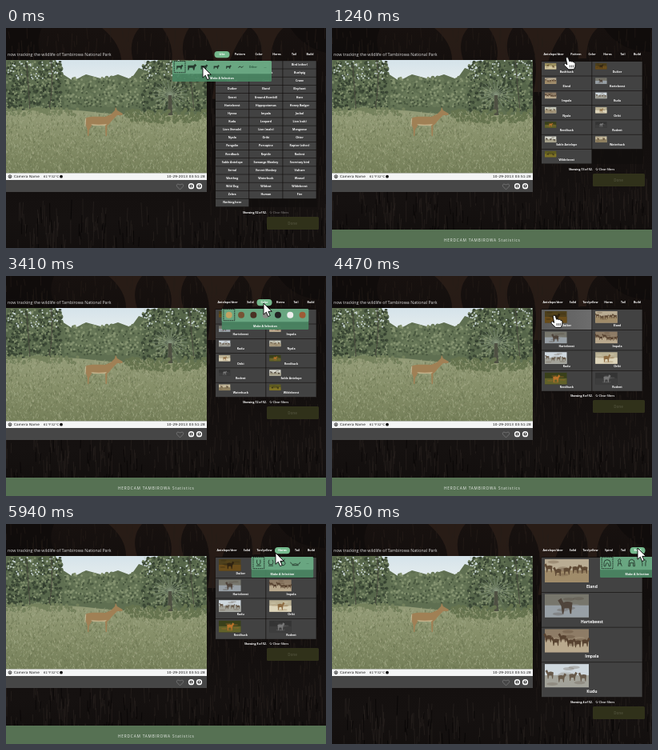
These frames come from a looping animation (400x275 px, 8 s). An HTML page:

```html
<!DOCTYPE html>
<html lang="en">
<head>
<meta charset="utf-8">
<title>Wildlife tracker filters</title>
<style>
html, body { margin: 0; width: 100%; height: 100%; overflow: hidden; background: #120e0c; }
svg { display: block; }
#stage { width: 100vw; height: 100vh; }
text { font-family: "Open Sans", sans-serif; fill: #fff; }
.ui { font-size: 3.5px; font-weight: 700; text-anchor: middle; }
.stamp text { font-family: "DejaVu Sans", sans-serif; font-size: 4.2px; letter-spacing: .18px; fill: #111; }
</style>
</head>
<body>
<svg id="stage" viewBox="0 0 400 275">
  <defs>
    <linearGradient id="dusk" x2="0" y2="1">
      <stop offset="0" stop-color="#17110f"/><stop offset=".25" stop-color="#110d0c"/>
      <stop offset=".7" stop-color="#151110"/><stop offset="1" stop-color="#0e0b0a"/>
    </linearGradient>
    <linearGradient id="sky" x2="0" y2="1">
      <stop offset="0" stop-color="#d5e3ea"/><stop offset=".3" stop-color="#eef2f0"/>
    </linearGradient>
    <linearGradient id="field" x2="0" y2="1">
      <stop offset="0" stop-color="#949c78"/><stop offset=".45" stop-color="#868f69"/>
      <stop offset="1" stop-color="#757f59"/>
    </linearGradient>
    <linearGradient id="lit" x2="1" y2="0">
      <stop offset="0" stop-color="#5b5b5b"/><stop offset="1" stop-color="#6d6d6d"/>
    </linearGradient>
  </defs>
  <g id="back"></g>
  <text x="2" y="35.2" font-size="5.3" fill-opacity=".85">now tracking the wildlife of Tambirowa National Park</text>
  <svg id="photo" y="40" width="251" height="141.5" viewBox="0 40 251 141.5"></svg>
  <g class="stamp">
    <path d="M0 181.5H251V190H0Z" fill="#f4f5f5"/>
    <circle cx="5" cy="185.7" r="1.9" fill="none" stroke="#222" stroke-width=".8"/>
    <path d="M3.7 184.4l2.6 2.6m0-2.6l-2.6 2.6" stroke="#222" stroke-width=".7"/>
    <text x="10" y="187.3">Camera Name</text>
    <text x="47" y="187.3" style="font-size:3.7px">61°F32°C</text>
    <circle cx="69" cy="185.7" r="1.9" fill="#111"/>
    <text x="201" y="187.3">10-29-2013 03:51:28</text>
  </g>
  <path d="M0 190H251V205H0Z" fill="#464646"/>
  <path d="M217.5 201.6C211 197.5 213 193.3 217.5 196C222 193.3 224 197.5 217.5 201.6Z" fill="none" stroke="#858585" stroke-width=".7"/>
  <g fill="#3a3a3a" stroke="#fff" stroke-width="1.5"><circle cx="231.5" cy="197.7" r="2.9"/><circle cx="241.5" cy="197.7" r="2.9"/></g>
  <path d="M231.5 196v.8m0 .7v2M241.5 196v2.2m0 .6v.7" stroke="#fff" stroke-width=".9"/>
  <g id="ui"></g>
  <g id="cursor"></g>
</svg>
<script>
const LOOP = 8000;
const $ = id => document.getElementById(id);

function rng(seed) {
  return () => (seed = (seed * 16807) % 2147483647) / 2147483647;
}

// Short random strokes gathered in one path.
function strokes(seed, n, [x, y, w, h], len, color, width) {
  const r = rng(seed * 7919);
  let d = '';
  for (let i = 0; i < n; i++) {
    d += `M${(x + r() * w).toFixed(1)} ${(y + r() * h).toFixed(1)}l${(r() * 3 - 1.5).toFixed(1)} ${(-len * (.4 + r())).toFixed(1)}`;
  }
  return `<path d="${d}" fill="none" stroke="${color}" stroke-width="${width}"/>`;
}

// Round dabs, drawn as zero-length strokes.
function leaves(seed, n, [x, y, w, h], size, color) {
  const r = rng(seed * 7919);
  let d = '';
  for (let i = 0; i < n; i++) d += `M${(x + r() * w).toFixed(1)} ${(y + r() * h).toFixed(1)}h0`;
  return `<path d="${d}" stroke="${color}" stroke-width="${size}" stroke-linecap="round"/>`;
}

const rect = (x, y, w, h, fill, more = '') =>
  `<rect x="${x}" y="${y}" width="${w}" height="${h}" fill="${fill}" ${more}/>`;
const label = (x, y, s, more = '') => `<text class="ui" x="${x}" y="${y}" ${more}>${s}</text>`;

function drawBack() {
  $('back').innerHTML = rect(0, 0, 400, 310, 'url(#dusk)') +
    `<path d="M128 0Q150 18 150 40H164Q156 16 170 0ZM196 0Q210 20 206 40H222Q214 18 226 0ZM238 0Q262 26 252 80H262Q268 30 292 0ZM296 0Q310 12 308 38H318Q318 12 332 0Z" fill="#2f211a" opacity=".7"/>
    <path d="M0 0H60Q50 24 66 40H0ZM340 0H400V30Q360 30 340 0Z" fill="#0b0908" opacity=".5"/>` +
    strokes(5, 300, [0, 215, 400, 95], 20, '#2a2421', .6) +
    strokes(8, 200, [250, 60, 150, 190], 20, '#241d1a', .6) +
    strokes(9, 140, [0, 215, 400, 95], 16, '#080606', .8) +
    strokes(3, 90, [0, 10, 400, 35], 14, '#261d19', .6);
}

function drawTree(seed, x, w) {
  const box = [x, 42, w, 62];
  return leaves(seed, 170, box, 6, '#56664a') + leaves(seed + 1, 130, box, 4, '#3c4936') +
    leaves(seed + 2, 160, box, 2.6, '#7d8b69') + leaves(seed + 3, 90, box, 2, '#2f3a2c') +
    leaves(seed + 4, 50, [x, 40, w, 24], 2, '#c9d5d3');
}

function drawPhoto() {
  let palm = '';
  for (let i = 0; i < 22; i++) {
    const a = i * Math.PI * 2 / 22;
    palm += `M205 83l${(Math.cos(a) * 22).toFixed(1)} ${(Math.sin(a) * 18).toFixed(1)}`;
  }
  const ground = [0, 106, 251, 78];
  $('photo').innerHTML = rect(0, 40, 251, 142, 'url(#sky)') +
    `<path d="M0 40H62L70 57 84 66 100 58 122 64 140 58 156 64 166 50 178 54 190 40H251V125H0Z" fill="#5f6f51"/>` +
    leaves(31, 150, [74, 62, 96, 36], 5, '#687858') + leaves(32, 120, [74, 62, 96, 36], 3, '#84926f') +
    leaves(33, 90, [74, 66, 96, 34], 2.6, '#4a5940') +
    drawTree(41, 0, 70) + drawTree(51, 170, 81) +
    `<path d="M56 40Q60 68 54 101M26 46L30 103M229 40L235 104" stroke="#4b4b3f" stroke-width="1" fill="none"/>
    <path d="${palm}" stroke="#87967f" stroke-width=".7"/>
    <path d="M203 84h4l1 26h-6z" fill="#4f5143"/>
    <path d="M0 104Q60 99 110 105T251 108V182H0Z" fill="url(#field)"/>` +
    leaves(61, 90, [150, 102, 101, 16], 5, '#66744f') + leaves(62, 70, [0, 100, 90, 9], 4, '#75825d') +
    strokes(21, 1100, ground, 2.6, '#a2aa87', .6) +
    strokes(22, 1100, ground, 2.6, '#69734f', .6) +
    strokes(23, 300, ground, 2, '#b6b799', .5) +
    `<path d="M99.5 113C103 110 113 111 124 111L131 108 136 103 137 98.5 139 103 146 107 145 109 139 109 133 115 129 120 126.5 122 126 135H124.6L124 122 108 120.5 104 127 103.3 135H102L101.7 127 99.8 121Z" fill="#a08055"/>
    <path d="M106 120Q116 121.5 126 120L124 122H109Z" fill="#c4b28b"/>
    <path d="M99.7 113L98.8 123" stroke="#d3c5a4" stroke-width=".8"/>`;
}

// Upper tone, lower tone, animal tone, herd size
const SPECIES = {
  Bushbuck: ['#9c915f', '#d3c7a0', '#60492a', 2], Duiker: ['#4e401c', '#6a4d1b', '#2f2311', 1],
  Eland: ['#b9ac93', '#a08c6a', '#5f4a35', 5], Hartebeest: ['#77766c', '#98a0a6', '#4f443b', 1],
  Impala: ['#8e7c66', '#b9a98e', '#574230', 6], Kudu: ['#cfd8de', '#a3a39a', '#675a4b', 4],
  Nyala: ['#c7c9bc', '#a5977b', '#6c5b43', 3], Oribi: ['#b9b093', '#ddd5bb', '#8d6c43', 1],
  Reedbuck: ['#39401a', '#62622a', '#b9722b', 1], Rodent: ['#343434', '#3d3d3d', '#777', 1],
  'Sable Antelope': ['#d5d5cb', '#a9a48e', '#4b4136', 3], Waterbuck: ['#c8bda0', '#8f8060', '#5c4a35', 2],
  Wildebeest: ['#5f5c20', '#807426', '#37331a', 2]
};
const ALL = ('Baboon,Bat,Bird (other),Buffalo,Bushbuck,Bushpig,Caracal,Civet,Crane,Duiker,Eland,Elephant,' +
  'Genet,Ground Hornbill,Hare,Hartebeest,Hippopotamus,Honey Badger,Hyena,Impala,Jackal,Kudu,Leopard,Lion (cub),' +
  'Lion (female),Lion (male),Mongoose,Nyala,Oribi,Otter,Pangolin,Porcupine,Raptor (other),Reedbuck,Reptile,Rodent,' +
  'Sable Antelope,Samango Monkey,Secretary bird,Serval,Vervet Monkey,Vulture,Warthog,Waterbuck,Weasel,' +
  'Wild Dog,Wildcat,Wildebeest,Zebra,Human,Fire,Nothing here').split(',');
const DEER = Object.keys(SPECIES);
const SOLID = DEER.slice(1);
const TAN = SOLID.filter(s => !/Nyala|Sable|Water|Wilde/.test(s));
const SPIRAL = ['Eland', 'Hartebeest', 'Impala', 'Kudu'];

const STAGES = [
  { t: 0, items: ALL, cols: 3, pitch: 10.15, tabs: ['Like', 'Pattern', 'Color', 'Horns', 'Tail', 'Build'], xs: [270, 292.5, 316, 338.5, 360, 380], done: 236 },
  { t: 390, items: DEER, cols: 2, pitch: 18.3, tabs: ['Antelope/deer', 'Pattern', 'Color', 'Horns', 'Tail', 'Build'], xs: [277, 305, 325, 344.5, 363.5, 381.5], done: 182 },
  { t: 2320, items: SOLID, cols: 2, pitch: 18.3, tabs: ['Antelope/deer', 'Solid', 'Color', 'Horns', 'Tail', 'Build'], xs: [277, 305.5, 323, 343, 362.5, 381], done: 163 },
  { t: 4410, items: TAN, cols: 2, pitch: 25.6, tabs: ['Antelope/deer', 'Solid', 'Tan/yellow', 'Horns', 'Tail', 'Build'], xs: [276, 301, 323, 345.5, 364, 381.5], done: 155 },
  { t: 7130, items: SPIRAL, cols: 1, pitch: 43.7, tabs: ['Antelope/deer', 'Solid', 'Tan/yellow', 'Spiral', 'Tail', 'Build'], xs: [276, 301, 323, 346, 364, 382], done: 228 }
];
const stageAt = t => STAGES.filter(s => s.t <= t).pop();

const MENUS = [
  { tab: 0, from: -200, to: 300, x: 270, n: 8 },
  { tab: 1, from: 1530, to: 2240, x: 303, n: 5 },
  { tab: 2, from: 3000, to: 4350, x: 324, n: 7 },
  { tab: 3, from: 5580, to: 7000, x: 345.5, n: 5, unmark: 6700 },
  { tab: 5, from: 7790, to: LOOP, x: 381.5, n: 6 }
];

// Pointer stops: time, x, y
const PATH = [
  [0, 246, 48], [950, 246, 49], [1240, 294, 36.5], [1350, 311, 32], [1830, 311, 32], [2180, 273, 49],
  [2650, 273, 49], [2820, 326, 28], [3100, 326, 28], [3410, 322, 34], [3650, 322, 34], [4110, 278, 49],
  [4600, 278, 49], [5040, 343, 31], [5820, 343, 31], [5940, 337, 36], [6200, 329, 48], [6590, 341, 49.5],
  [7180, 341, 49.5], [7510, 382, 30], [LOOP, 382, 30]
];
const ARROWS = [[0, 120], [1530, 2050], [3000, 3900], [5400, 6080], [7510, LOOP]];

function pointer(t) {
  const i = Math.max(1, PATH.findIndex(p => p[0] > t));
  const [t0, x0, y0] = PATH[i - 1], [t1, x1, y1] = PATH[i];
  const k = (t - t0) / (t1 - t0);
  return [x0 + (x1 - x0) * k, y0 + (y1 - y0) * k];
}

function thumb(name, x, y, scale) {
  const [top, low, body, herd] = SPECIES[name];
  const r = rng(name.length * 97700 + name.charCodeAt(0) * 331);
  r();
  let s = rect(0, 0, 55, 29, top) + rect(0, 14, 55, 15, low);
  for (let i = 0; i < 9; i++) {
    s += `<ellipse cx="${(8 + r() * 39).toFixed(1)}" cy="${(3 + r() * 22).toFixed(1)}" rx="7" ry="2" fill="${i % 2 ? low : body}" opacity=".3"/>`;
  }
  const size = herd === 1 ? 1.4 : .8;
  for (let i = 0; i < herd; i++) {
    const cx = 55 * (i + .5) / herd, cy = 12 + (herd > 1 ? r() * 7 - 3 : 0);
    const flip = r() > .5 ? -size : size;
    s += `<path transform="translate(${cx.toFixed(1)} ${cy.toFixed(1)}) scale(${flip} ${size})" d="M-5 -1q5 -2 8 0l2 -4 3 2 -3 5 -1 7h-1l-1 -5h-4l-1 5h-1z" fill="${body}"/>`;
  }
  return `<g transform="translate(${x} ${y}) scale(${scale})">${s}</g>`;
}

function list(st, mx, my) {
  const { items, cols, pitch } = st, w = 126.4 / cols, top = cols === 3 ? 41.2 : 42;
  return items.map((name, i) => {
    const x = 262 + (i % cols) * w, y = top + Math.floor(i / cols) * pitch;
    const over = mx >= x && mx < x + w && my >= y && my < y + pitch;
    const cell = rect(x, y, w - .7, pitch - .6, over ? 'url(#lit)' : '#424242');
    const mid = x + w / 2;
    if (cols === 3) return cell + label(mid - .3, y + 5.7, name);
    const scale = cols === 1 ? 1 : pitch > 20 ? .5 : .26;
    const base = cols === 1 ? 37.8 : pitch > 20 ? 21.2 : 13.8;
    return cell + thumb(name, x + 4, y + 2, scale) +
      label(mid - .3, y + base, name, cols === 1 ? 'style="font-size:5px"' : '');
  }).join('');
}

const line = d => `<path d="${d}" fill="none" stroke="#26382d" stroke-width=".9"/>`;
const dots = '<text class="ui" y="1" style="fill:#2e5a42">...</text>';
const beast = s => `<path transform="scale(${s})" d="M-5 -2H2L4 -4 6 -2 4 0 3 4H2L1 1H-3L-4 4H-5Z" fill="#26382d"/>`;
const ICONS = [
  i => i < 5 ? beast([.75, 1, .8, .65, .6][i]) : i === 5 ? line('M-3 1q1.5 -3 3 -1t3 -1') :
    i === 6 ? '<text class="ui" y="1" style="fill:#2e5a42">Other</text>' : dots,
  i => i === 4 ? dots : '<circle r="4" fill="#35513f"/>' +
    ['', 'M-2 -3V3M0 -4V4M2 -3V3', 'M-2 -1h1M1 -2h1M0 2h1', 'M-4 0H4'].map(d => `<path d="${d}" stroke="#a5cfb3"/>`)[i],
  i => `<circle r="4" fill="${['#c3a262', '#775335', '#4a3023', '#8a8a86', '#222', '#eee', '#9e5b35'][i]}"/>`,
  i => i === 4 ? dots : line(['M-2 -4Q-3 0 -1 2H1Q3 0 2 -4M-3 3.5H3', 'M-2 -4Q-4 -1 -2 2H2Q4 -1 2 -4M-3 3.5H3',
    'M-2 -5Q0 -3 -2 -1T-1 3H1Q4 1 2 -1T2 -5', 'M-6 -1Q-5 3 0 1Q5 3 6 -1M-4 3H4'][i]),
  null,
  i => i === 5 ? dots : line(['M-4 4V0Q-4 -4 0 -4T4 0V4H2Q2 0 0 0T-2 4Z', 'M-2 4L-1 -1Q-3 -4 0 -5Q3 -4 1 -1L3 4M-1 1H2',
    'M-4 4L-3 -3Q0 -6 3 -3L4 4H2V0H-2V4Z', 'M-2 4V0Q-4 -4 0 -4T2 0V4', 'M-4 3V-1H4V3'][i])
];

function menu(m, t) {
  const w = m.n * 15.5, x = m.x - w / 2;
  const alpha = Math.min(1, .5 + (t - m.from) / 120);
  let s = rect(x, 41, w, 26, '#4a8562', 'rx="1.5" opacity=".94"') +
    rect(x, 41, w, 16.2, '#6fad88', 'rx="1.5" opacity=".85"');
  for (let i = 0; i < m.n; i++) {
    s += `<g transform="translate(${x + 9 + i * 15.3} 48.7)">${ICONS[m.tab](i)}</g>`;
  }
  if (!(t >= m.unmark)) {
    s += rect(x + 2.2, 41.5, 13.8, 14.2, 'none', 'stroke="#111" stroke-width=".9" stroke-dasharray="1.4 .9"');
  }
  return `<g opacity="${alpha.toFixed(2)}">${s}${label(m.x, 63.8, 'Make A Selection')}</g>`;
}

function drawUi(t, mx, my) {
  const st = stageAt(t);
  const open = MENUS.find(m => t >= m.from && t < m.to);
  const y = st.done, all = st.items === ALL;
  let s = rect(261.6, 41, 127, y - 53, '#100e0d', 'opacity=".75"');
  s += open ? list(st, 0, 0) : list(st, mx, my);
  st.tabs.forEach((name, i) => {
    const x = st.xs[i];
    if (open && open.tab === i) s += rect(x - 9.5, 29, 19, 8.2, '#75b98d', 'rx="4"');
    s += label(x, 34.3, name);
  });
  s += label(325.8, y - 4.4, `Showing ${st.items.length} of 52.`, 'style="text-anchor:end"');
  s += `<g opacity="${all ? .4 : 1}"><path d="M330.8 ${y - 6.8}a1.2 1.2 0 1 0 1.4 .5" fill="none" stroke="#fff" stroke-width=".6"/>` +
    label(333.8, y - 4.4, 'Clear filters', 'style="text-anchor:start;font-weight:600"') + '</g>';
  s += rect(326, y, 65, 16, '#30311a', 'rx="1.5"') + label(358, y + 9.6, 'Done', 'style="font-size:4.5px;fill:#4b4c36"');
  const foot = Math.max(252, y + 70);
  s += rect(0, foot, 400, 60, '#567153') +
    `<text x="187.8" y="${foot + 15.1}" text-anchor="middle" font-size="4.8" letter-spacing=".8" fill-opacity=".88">HERDCAM TAMBIROWA Statistics</text>`;
  if (open) s += menu(open, t);
  return s;
}

const ARROW = '<path d="M0 0V14.2L3.3 11.2 5.7 16.6 8.2 15.5 5.9 10.3H10.3Z" fill="#fff" stroke="#000" stroke-width=".9"/>';
const HAND = '<path d="M-1.8 1.4Q-.2 -1 1.4 1.2L2.6 5.2Q4.2 4 5.2 5.6 7 4.6 7.9 6.4 9.8 6 10 8.2L9.7 12 8.4 15.3H1.6L-3.8 10.2Q-4.8 7.8 -2.5 7.8L-.3 9.4Z" fill="#fff" stroke="#000" stroke-width=".9"/><path d="M3.1 10v3M5.2 10v3M7.3 10v3" stroke="#000" stroke-width=".7"/>';

let shown = '', shape = '';
function update(t) {
  const [x, y] = pointer(t);
  const ui = drawUi(t, x, y);
  if (ui !== shown) $('ui').innerHTML = shown = ui;
  const next = ARROWS.some(([a, b]) => t >= a && t < b) ? ARROW : HAND;
  if (next !== shape) $('cursor').innerHTML = shape = next;
  $('cursor').setAttribute('transform', `translate(${x.toFixed(2)} ${y.toFixed(2)})`);
  $('back').setAttribute('transform', stageAt(t).done > 200 ? 'translate(-22 0) scale(1.11)' : '');
}

drawBack();
drawPhoto();
const start = performance.now();
function tick() {
  update((performance.now() - start) % LOOP);
  requestAnimationFrame(tick);
}
tick();
</script>
</body>
</html>
```
